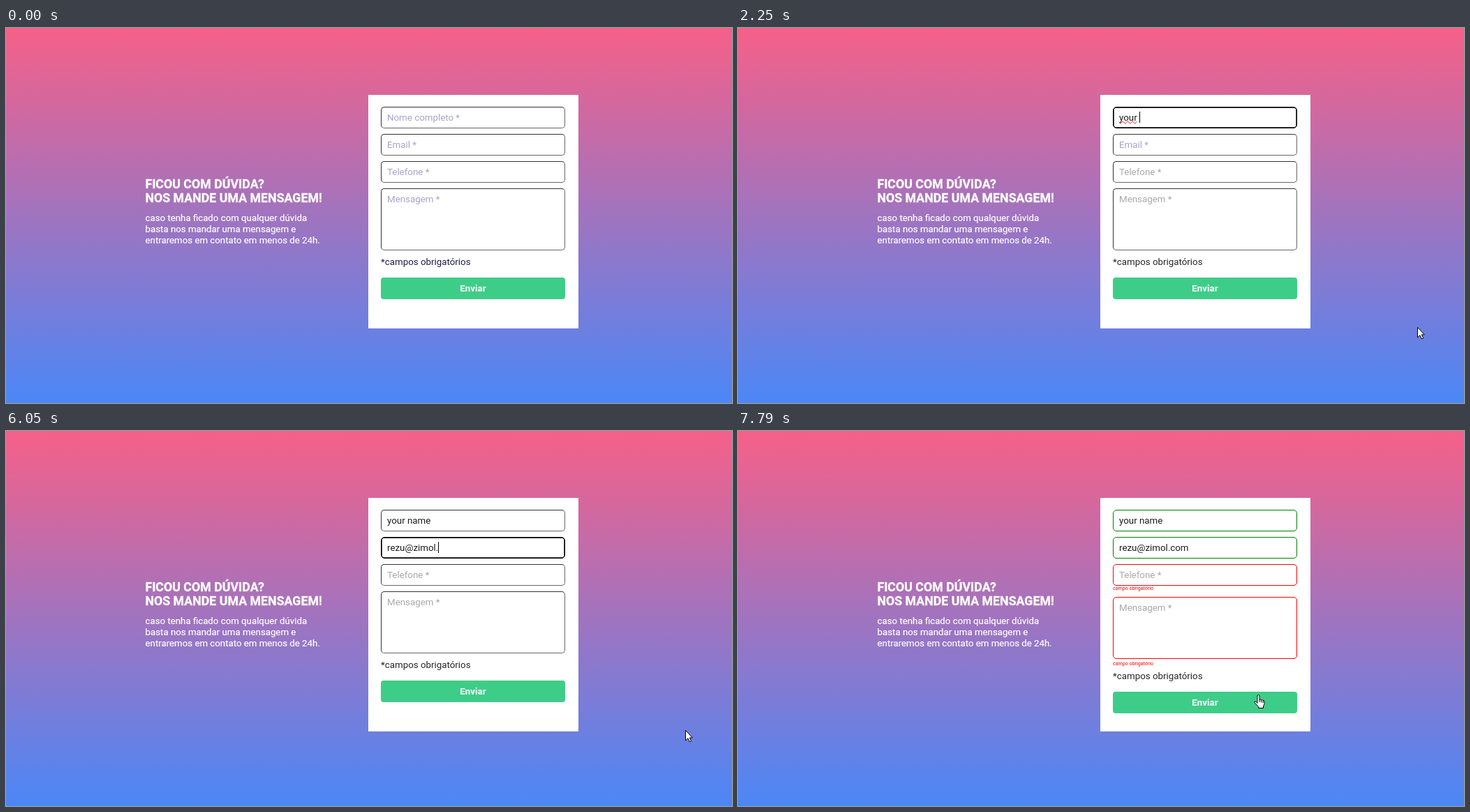
Recreate the animation shown at these times as an HTML page. Size 1040x538 px, loop 8000 ms.

```html
<!DOCTYPE html>
<html lang="pt-BR">
<head>
<meta charset="utf-8">
<title>Formulário de contato</title>
<style>
html, body { margin: 0; width: 100%; height: 100%; overflow: hidden; }
body {
  position: relative;
  background: linear-gradient(#f66088, #4b87f6);
  font: 13.333px/16px Roboto, sans-serif;
  color: #fff;
}
h1, p, .card, .field, .error, .note, .button, .pointer { position: absolute; margin: 0; white-space: pre; }
h1 { left: 199.4px; top: 214px; font-size: 17.78px; line-height: 20px; font-weight: 700; -webkit-text-stroke: .3px; }
p { left: 199.6px; top: 265px; font-size: 13.25px; -webkit-text-stroke: .2px; }
.card { left: 519px; top: 96px; width: 301px; height: 335px; background: #fff; }
.field {
  --dark: #333; --soft: #666;
  left: 537px; width: 264px; height: 31px; box-sizing: border-box; padding-left: 8px;
  border: 1px solid; border-color: var(--dark) var(--soft) var(--soft) var(--dark); border-radius: 5px;
  line-height: 29px; color: #1c1c1c;
}
.field.focused { --dark: #000; --soft: #000; box-shadow: inset 0 0 0 .7px #000; }
.field.valid { --dark: #008000; --soft: #008000; }
.field.invalid { --dark: #f00; --soft: #f00; }
.area { height: 89px; }
.hint { color: #aaa1c8; }
.gray .hint { color: #a8a8a8; }
.misspelled { text-decoration: underline wavy #c22 1px; text-decoration-skip-ink: none; text-underline-offset: 0; }
.caret { position: absolute; top: 6px; width: 1px; height: 16px; background: #000; }
.error { left: 537px; font-size: 7.1px; line-height: 8px; color: #f00; }
.note { left: 537px; top: 328.4px; color: #1f1c48; }
.note.gray { color: #262626; }
.button {
  left: 537px; top: 357.5px; width: 264px; height: 31px; border-radius: 4px;
  background: #3ecd88; font-weight: 700; line-height: 31px; text-align: center;
}
.pointer { left: 0; top: 0; overflow: visible; fill: #fff; stroke: #000; stroke-linejoin: round; }
</style>
</head>
<body>
<h1>FICOU COM DÚVIDA?
NOS MANDE UMA MENSAGEM!</h1>
<p>caso tenha ficado com qualquer dúvida
basta nos mandar uma mensagem e
entraremos em contato em menos de 24h.</p>
<div class="card"></div>
<div class="field" id="name" style="top:113px"><span class="typed"></span><i class="caret"></i><span class="hint">Nome completo *</span></div>
<div class="field" id="email" style="top:152px"><span class="typed"></span><i class="caret"></i><span class="hint">Email *</span></div>
<div class="field" id="phone" style="top:191px"><span class="hint">Telefone *</span></div>
<div class="error" style="top:222px">campo obrigatório</div>
<div class="field area" id="message" style="top:230px"><span class="hint">Mensagem *</span></div>
<div class="error" style="top:330px">campo obrigatório</div>
<div class="note" id="note">*campos obrigatórios</div>
<div class="button" id="send">Enviar</div>
<svg class="pointer" width="16" height="20">
  <path id="arrow" d="M.5.5V15L3.9 11.8 6.3 17 8.6 16 6.3 11H10.3Z"/>
  <path id="hand" transform="translate(-6)" d="M5 12.5V2.2Q5 .5 6.5.5T8 2.2V7.5Q9.5 6.5 10.5 8 12 7 13 8.5 15 8 15 10.5V13.5L13.5 17V19.5H6.5V17.5L1 11.5Q.5 9.5 2.5 10ZM8 7.5V11M10.5 8V11.5M13 8.8V12"/>
</svg>
<script>
const LOOP = 8000, FOCUS_NAME = 1210, FOCUS_EMAIL = 3260, SUBMIT = 7790;
const $ = selector => document.querySelector(selector);

const inputs = {
  name: { text: 'your name', keys: [1630, 1770, 1910, 2050, 2180, 2390, 2530, 2600, 2740], from: FOCUS_NAME, to: FOCUS_EMAIL },
  email: {
    text: 'rezu@zimol.com',
    keys: [3850, 4050, 4250, 4450, 4650, 5120, 5330, 5640, 5710, 5850, 5990, 6060, 6130, 6210],
    from: FOCUS_EMAIL, to: SUBMIT
  }
};

// Pointer way points: time, x, y
const path = [[70, 977, 440], [210, 965, 420], [430, 973, 429], [6910, 966, 430], [7180, 917, 429], [7600, 745, 378]];
const MOVE_START = 6910, MOVE_STEP = 67.5;

function pointerAt(t) {
  if (t < MOVE_START) t = Math.min(t, 430);
  else t = MOVE_START + Math.floor((t - MOVE_START) / MOVE_STEP) * MOVE_STEP;
  const next = path.findIndex(point => point[0] > t);
  if (next < 0) return path[path.length - 1].slice(1);
  const a = path[next - 1], b = path[next];
  const k = (t - a[0]) / (b[0] - a[0]);
  return [1, 2].map(i => Math.round(a[i] + (b[i] - a[i]) * k));
}

function drawInput(id, t) {
  const { text, keys, from, to } = inputs[id];
  const field = $('#' + id), typed = field.querySelector('.typed');
  const count = keys.filter(key => key <= t).length;
  const focused = t >= from && t < to;
  const lastEvent = Math.max(from, keys[count - 1] || 0);
  const value = text.slice(0, count);
  typed.textContent = value;
  if (id === 'name' && focused && count >= 5) {
    const word = document.createElement('span');
    word.className = 'misspelled';
    word.textContent = value.slice(0, 4);
    typed.replaceChildren(word, value.slice(4));
  }
  field.querySelector('.hint').hidden = count > 0;
  field.querySelector('.caret').hidden = !focused || Math.floor((t - lastEvent) / 500) % 2 === 1;
  field.classList.toggle('focused', focused);
  field.classList.toggle('valid', t >= SUBMIT);
}

function draw(t) {
  const sent = t >= SUBMIT;
  drawInput('name', t);
  drawInput('email', t);
  for (const id of ['phone', 'message', 'note']) $('#' + id).classList.toggle('gray', t >= FOCUS_NAME);
  for (const id of ['phone', 'message']) $('#' + id).classList.toggle('invalid', sent);
  document.querySelectorAll('.error').forEach(error => error.hidden = !sent);
  const shift = (id, y) => $('#' + id).style.marginTop = sent ? y + 'px' : 0;
  shift('message', 8);
  shift('note', 16);
  shift('send', 16);

  $('.pointer').style.display = t < 70 ? 'none' : '';
  if (t < 70) return;
  const [x, y] = pointerAt(t);
  const overButton = x < 801 && y < 389;
  $('.pointer').style.transform = `translate(${x}px, ${y}px)`;
  $('#arrow').style.display = overButton ? 'none' : '';
  $('#hand').style.display = overButton ? '' : 'none';
}

const start = performance.now();
function frame() {
  draw((performance.now() - start) % LOOP);
  requestAnimationFrame(frame);
}
frame();
</script>
</body>
</html>
```
